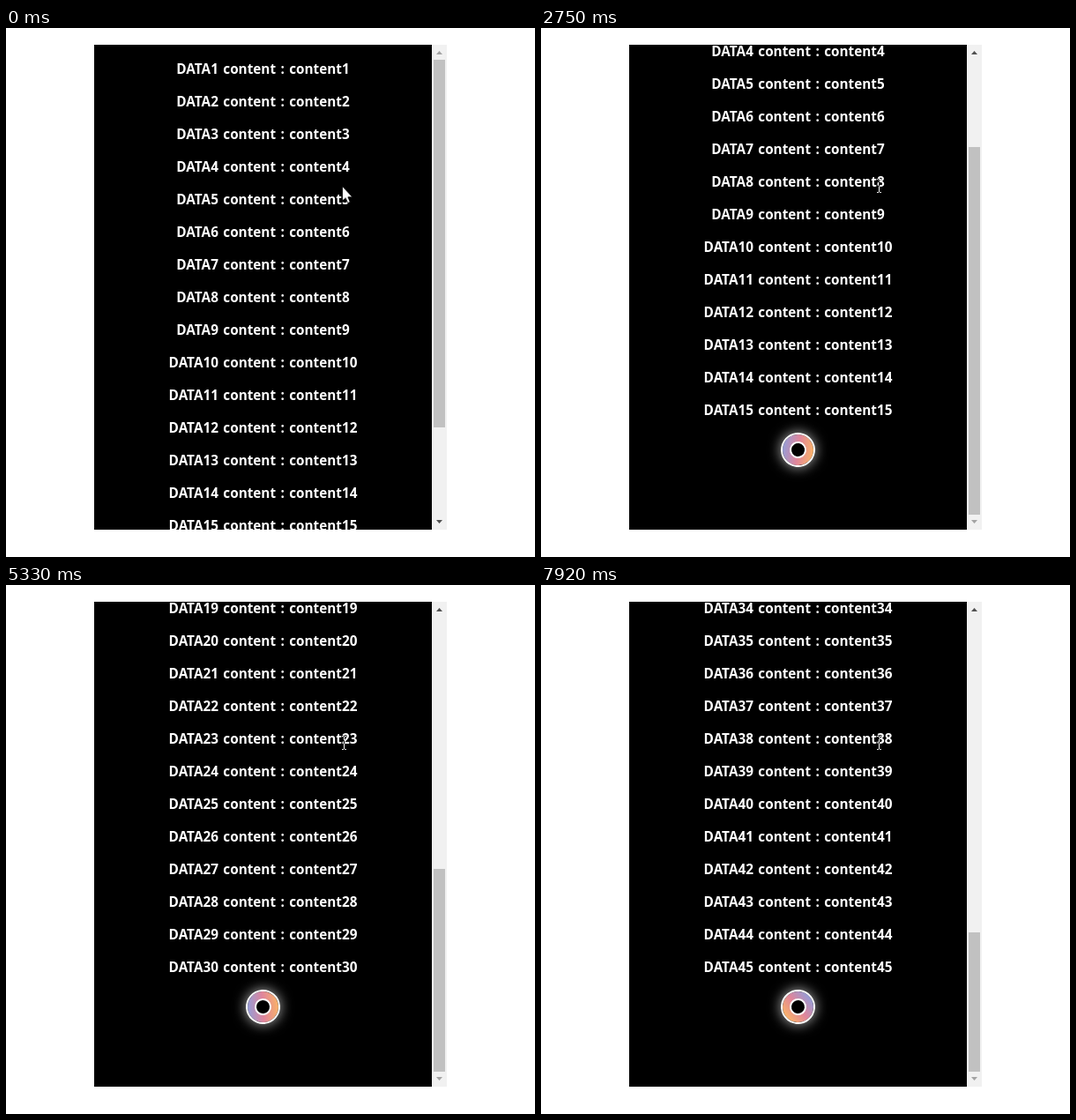
An HTML page that plays this animation: 600x600 px, repeating every 8 s.

```html
<!DOCTYPE html>
<html lang="en">
<head>
<meta charset="utf-8">
<title>Infinite scroll</title>
<style>
  html, body { margin: 0; width: 100%; height: 100%; overflow: hidden; background: #fff; }
  #panel { position: absolute; left: 100px; top: 19px; width: 383px; height: 550px; overflow: hidden; background: #000; }
  #list { position: relative; font: 700 15.3px/22px "Open Sans", "Noto Sans", sans-serif; word-spacing: 1.4px; color: #fff; text-align: center; }
  #list p { position: absolute; left: 0; width: 100%; margin: 0; white-space: nowrap; }
  #loader { position: absolute; left: 172px; width: 35px; height: 35px; border: 2px solid #fff; border-radius: 50%;
    background: linear-gradient(45deg, #fbb565 12%, #e0859b 50%, #8f9edb 88%) padding-box; box-shadow: 0 0 14px 1px #fff9; }
  #loader::after { content: ""; position: absolute; inset: 8px; border: 2px solid #fff; border-radius: 50%; background: #000; }
  #bar { position: absolute; left: 483px; top: 19px; width: 17px; height: 550px; background: #f1f1f1; }
  #thumb { position: absolute; left: 2px; width: 13px; background: #c1c1c1; }
  svg { position: absolute; left: 0; top: 0; }
  #beam { mix-blend-mode: difference; }
</style>
</head>
<body>
<div id="panel"><div id="list"><p id="more">Scroll down to view more data</p><div id="loader"></div></div></div>
<div id="bar"><div id="thumb"></div></div>
<svg width="600" height="600">
  <path id="up" d="M488 30h7l-3.5-4z"/>
  <path id="down" d="M488 558h7l-3.5 4z"/>
  <path id="arrow" d="M381.5 179.5v16.5l3.7-3.3 2.5 5.8 2.6-1.1-2.4-5.6h5z" fill="#fff" stroke="#000" stroke-width=".8"/>
</svg>
<svg id="beam" width="600" height="600"><path d="M381 171.5h2m1 0h2m-2.5.5v14m-2.5.5h2m1 0h2" fill="none" stroke="#fff"/></svg>
<script>
const LOOP = 8000, FPS = 12, ROW = 37, VIEW = 550, TRACK = 516, PAGE = 15;
const $ = id => document.getElementById(id);

// [tick, scroll offset], linear in between
const scrollKeys = [[0, 0], [13, 0], [14, 8], [16, 85], [17, 100], [23, 100], [24, 117], [25, 131],
  [48, 131], [49, 145], [52, 330], [55, 640], [56, 686], [77, 686], [78, 690], [79, 745],
  [83, 1150], [84, 1186], [91, 1186], [92, 1197], [94, 1241], [96, 1241]];
// [first tick, last tick, spin start in seconds]
const loads = [[25, 44, 2.1], [56, 75, 4.72], [94, 96, 7.9]];

const rows = Array.from({ length: 3 * PAGE }, (_, i) => {
  const row = document.createElement("p");
  row.textContent = `DATA${i + 1} content : content${i + 1}`;
  row.style.top = 16 + i * ROW + "px";
  $("list").append(row);
  return row;
});

function scrollAt(tick) {
  const i = scrollKeys.findIndex(key => key[0] > tick);
  const [t0, y0] = scrollKeys[i - 1], [t1, y1] = scrollKeys[i];
  return Math.round(y0 + (y1 - y0) * (tick - t0) / (t1 - t0));
}

const show = (el, on) => el.style.visibility = on ? "visible" : "hidden";

function draw(ms) {
  const tick = Math.floor((ms % LOOP + 5) * FPS / 1000) % 96;
  const scroll = scrollAt(tick);
  const count = PAGE * (1 + (tick >= 44) + (tick >= 75));
  const height = 126 + count * ROW, maxScroll = height - VIEW;
  const thumb = Math.round(VIEW * TRACK / height);
  const load = loads.find(([from, to]) => tick >= from && tick < to);

  $("list").style.top = -scroll + "px";
  rows.forEach((row, i) => show(row, i < count));
  $("more").style.top = 16 + count * ROW + "px";
  show($("more"), !load);
  show($("loader"), load);
  $("loader").style.top = 16 + count * ROW + "px";
  if (load) $("loader").style.transform = `rotate(${(tick / FPS - load[2]) * 360}deg)`;

  $("thumb").style.top = 17 + Math.floor(scroll * (TRACK - thumb) / maxScroll) + "px";
  $("thumb").style.height = thumb + "px";
  $("up").style.fill = scroll > 0 ? "#505050" : "#a3a3a3";
  $("down").style.fill = scroll < maxScroll ? "#505050" : "#a3a3a3";

  const overText = tick >= 26 && tick < 87 || tick >= 94;
  show($("beam"), overText);
  show($("arrow"), !overText);
}

(function loop() {
  draw(performance.now());
  requestAnimationFrame(loop);
})();
</script>
</body>
</html>
```
